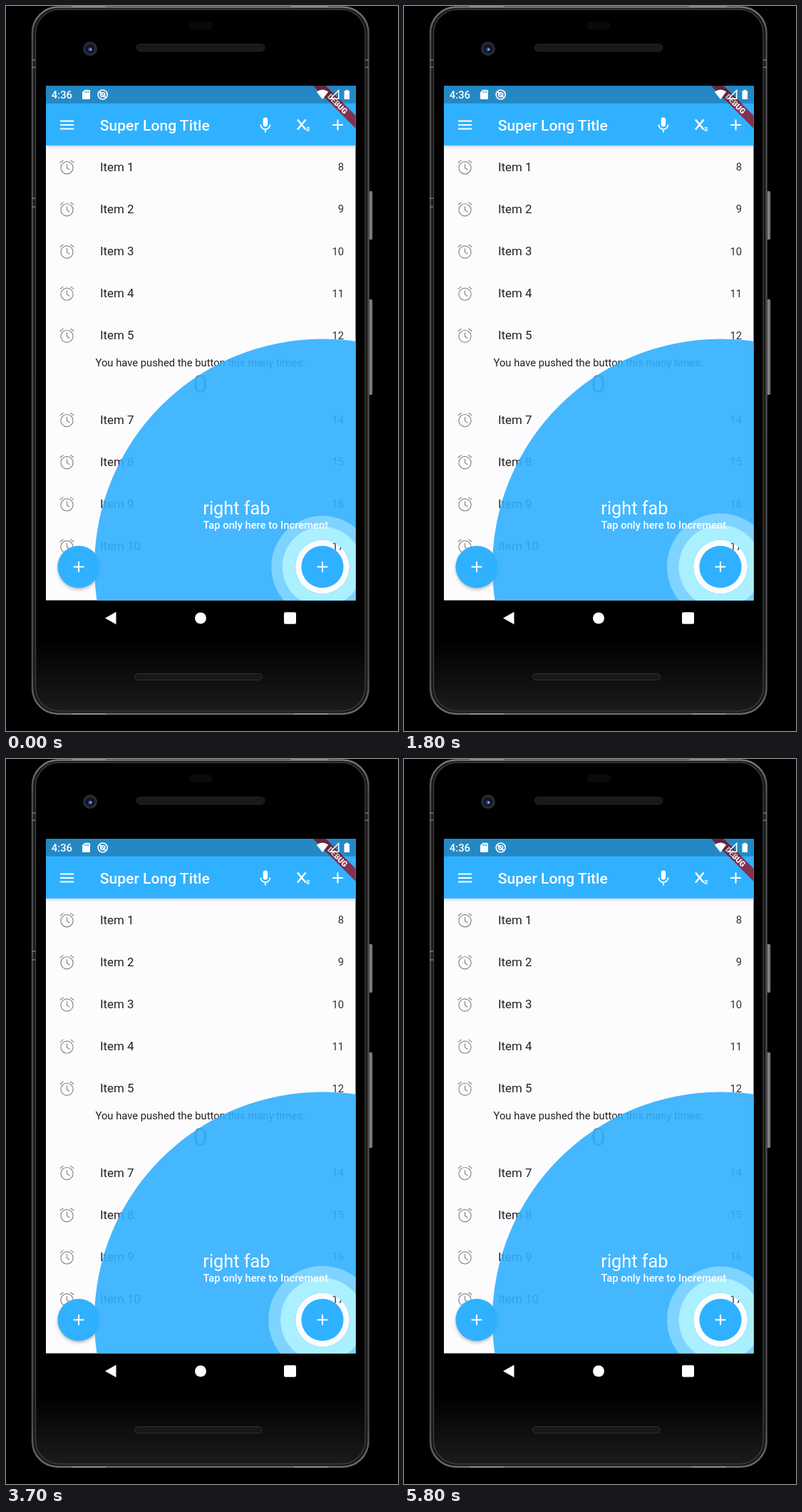
An HTML page that plays this animation: 550x1018 px, repeating every 5840 ms.

```html
<!DOCTYPE html>
<html lang="en">
<head>
<meta charset="utf-8">
<title>Feature highlight</title>
<style>
  html, body { margin: 0; width: 100%; height: 100%; overflow: hidden; background: #000; }
  svg { display: block; width: 100vw; height: 100vh; }
  text { font-family: Roboto, "Noto Sans", sans-serif; }
</style>
</head>
<body>
<svg viewBox="0 0 550 1018">
  <defs>
    <linearGradient id="rim" x1="0" y1="0" x2="0" y2="1">
      <stop offset="0" stop-color="#777"/>
      <stop offset=".05" stop-color="#4c4c4e"/>
      <stop offset=".94" stop-color="#4a4a4b"/>
      <stop offset="1" stop-color="#6c6c68"/>
    </linearGradient>
    <linearGradient id="chin" x1="0" y1="0" x2="0" y2="1">
      <stop offset=".9" stop-color="#000"/>
      <stop offset="1" stop-color="#1b1b1b"/>
    </linearGradient>
    <linearGradient id="key" x1="0" x2="1">
      <stop offset="0" stop-color="#3c3c3c"/>
      <stop offset=".6" stop-color="#92928e"/>
      <stop offset="1" stop-color="#444"/>
    </linearGradient>
    <filter id="soft" x="-30%" y="-30%" width="160%" height="160%">
      <feGaussianBlur stdDeviation="2.5"/>
    </filter>
    <clipPath id="screen"><path d="M56 112H490.500V834.500H56Z"/></clipPath>
    <g id="alarm" fill="none" stroke="#858580" stroke-width="1.150">
      <circle cy="1.200" r="8.600"/>
      <path d="M0 -4V1.500L3.800 4M-9.800 -5.800L-5 -9.600M9.800 -5.800L5 -9.600"/>
    </g>
    <path id="plus" d="M-7.400 0H7.400M0 -7.400V7.400" stroke="#fff" stroke-width="2.100"/>
  </defs>

  <!-- phone body -->
  <g>
    <rect x="508" y="260" width="6.500" height="68" rx="2" fill="url(#key)"/>
    <rect x="508" y="412" width="6.500" height="134" rx="2" fill="url(#key)"/>
    <rect x="37" y="1.500" width="471.500" height="992.500" rx="36" fill="#171717" stroke="url(#rim)" stroke-width="2.500"/>
    <rect x="41.500" y="5" width="462.500" height="985" rx="33" fill="url(#chin)" stroke="#3b3b3c" stroke-width="1.500"/>
    <path d="M36 76H41M36 86H41M36 270H41M36 282H41M504 76H509M504 86H509" stroke="#777" stroke-width="1.500"/>
    <path d="M92 1H140M400 1H452M92 994H140M404 994H452" stroke="#8a8a84" stroke-width="2"/>
    <rect x="257" y="22" width="32" height="11" rx="4" fill="#09090e"/>
    <rect x="183" y="53.500" width="180" height="10" rx="5" fill="#191919" stroke="#252525"/>
    <rect x="180.500" y="937.500" width="179" height="9" rx="4.500" fill="#181818" stroke="#303030"/>
    <circle cx="118" cy="60" r="10" fill="#2b2b2d"/>
    <circle cx="118" cy="60" r="6.500" fill="#11142b"/>
    <circle cx="118" cy="61" r="2.700" fill="#36529c"/>
    <circle cx="119" cy="61" r="1.200" fill="#a9c2f2"/>
  </g>

  <g clip-path="url(#screen)">
    <path d="M56 112H491V835H56Z" fill="#fcfcfe"/>
    <g id="rows"></g>
    <text x="272.500" y="505.500" font-size="14.780" text-anchor="middle" fill="#222">You have pushed the button this many times:</text>
    <text x="272.500" y="543" font-size="35.900" text-anchor="middle" fill="#757575">0</text>

    <!-- app bar -->
    <path d="M56 137H491V197H56Z" fill="#7f9fb2" filter="url(#soft)" opacity=".55"/>
    <path d="M56 112H491V195.700H56Z" fill="#30b1ff"/>
    <path d="M76 161.500H95.200M76 167H95.200M76 172.500H95.200" stroke="#fff" stroke-width="2.100"/>
    <text x="131.700" y="174.700" font-size="21.120" font-weight="500" fill="#fff">Super Long Title</text>
    <rect x="360.700" y="156.500" width="6.400" height="13" rx="3.200" fill="#fff"/>
    <path d="M357.300 166.500A6.600 6.600 0 0 0 370.500 166.500M363.900 173V177.500" fill="none" stroke="#fff" stroke-width="1.900"/>
    <path d="M409 159.500L420.500 173.500M420.500 159.500L409 173.500" stroke="#fff" stroke-width="2.500"/>
    <path d="M421.500 170.500H425.200V172.700H422.200V174.900H426" fill="none" stroke="#fff" stroke-width="1.100"/>
    <use href="#plus" x="465.500" y="167"/>

    <!-- left button -->
    <circle cx="102" cy="790" r="29" fill="#000" opacity=".3" filter="url(#soft)"/>
    <circle cx="102" cy="787.500" r="29.600" fill="#30b1ff"/>
    <use href="#plus" x="102" y="787.500"/>

    <!-- highlight -->
    <path id="disc" fill="#30b0ff" fill-opacity=".9" fill-rule="evenodd"/>
    <path id="outer" fill="#7fd3ff" fill-rule="evenodd"/>
    <path id="inner" fill="#aaf0ff" fill-rule="evenodd"/>
    <circle cx="444" cy="787.500" r="29.600" fill="#30b1ff"/>
    <use href="#plus" x="444" y="787.500"/>
    <text x="276.300" y="714" font-size="25.340" fill="#fff">right fab</text>
    <text x="276.500" y="734" font-size="14.780" font-weight="500" fill="#fff">Tap only here to Increment</text>

    <!-- banner and status bar -->
    <g transform="translate(490.500 112) rotate(45)">
      <path d="M-43 29.600H43V42.200H-43Z" fill="#931a30" fill-opacity=".84"/>
      <text y="39.700" font-size="10.770" font-weight="900" text-anchor="middle" fill="#fff">DEBUG</text>
    </g>
    <path d="M56 112H491V136.800H56Z" fill="#000" opacity=".23"/>
    <g fill="#fff">
      <text x="63.800" y="130" font-size="14.800" font-weight="500">4:36</text>
      <path d="M110.500 117.700H116.500Q118 117.700 118 119.200V129.500Q118 131 116.500 131H108.500Q107 131 107 129.500V121.300Z"/>
      <path d="M111 119.500V122M113.300 119.500V122M115.600 119.500V122" stroke="#2788c4"/>
      <g fill="none" stroke="#fff" stroke-width="1.700">
        <circle cx="135.700" cy="124.500" r="6.500"/>
        <circle cx="135.700" cy="124.500" r="3"/>
        <path d="M131 120L140.300 129"/>
      </g>
      <path d="M435.800 120.500Q444 114.700 452.200 120.500L444 131Z"/>
      <path d="M466.700 118.500V130.200H455Z" fill="none" stroke="#fff" stroke-width="1.500"/>
      <path d="M476.500 117.700H480V119H482V131H474.500V119H476.500Z"/>
    </g>
  </g>

  <!-- navigation -->
  <g fill="#fff">
    <path d="M139 859.500L154.500 850.800V868.200Z"/>
    <circle cx="273" cy="859.500" r="8"/>
    <rect x="390" y="851.200" width="17" height="16.600" rx="2"/>
  </g>
</svg>
<script>
const LOOP = 5840, HALF = 1000, LOW_POINT = 550;
const CENTER = { x: 444, y: 787.5 }, HOLE = 38;
const DP = 1.056;
const byId = id => document.getElementById(id);

const rowMarkup = n => {
  const y = 226 + (n - 1) * 59.15;
  return `<use href="#alarm" x="85.500" y="${y}"/>
    <text x="132" y="${y + 5.6}" font-size="16.900" fill="#222">Item ${n}</text>
    <text x="474" y="${y + 5.2}" font-size="14.780" text-anchor="end" fill="#303030">${n + 7}</text>`;
};
byId('rows').innerHTML = [1, 2, 3, 4, 5, 7, 8, 9, 10].map(rowMarkup).join('');

const circle = r => `M${CENTER.x - r} ${CENTER.y}a${r} ${r} 0 1 0 ${2 * r} 0a${r} ${r} 0 1 0 ${-2 * r} 0Z`;
const setRing = (id, r) => byId(id).setAttribute('d', circle(r) + circle(HOLE));

// cubic-bezier(.4, 0, .2, 1), solved by bisection
function ease(x) {
  let lo = 0, hi = 1;
  for (let i = 0; i < 24; i++) {
    const s = (lo + hi) / 2, q = 1 - s;
    if (1.2 * q * q * s + 0.6 * q * s * s + s ** 3 < x) lo = s; else hi = s;
  }
  return lo * lo * (3 - 2 * lo);
}

function draw(time) {
  const phase = (time % LOOP - LOW_POINT + 2 * HALF) % (2 * HALF) / HALF;
  const v = ease(phase > 1 ? 2 - phase : phase);
  setRing('outer', DP * (48 + 24 * v));
  setRing('inner', DP * (40 + 16 * v));
}

setRing('disc', 320);
const start = performance.now();
function tick() {
  draw(performance.now() - start);
  requestAnimationFrame(tick);
}
tick();
</script>
</body>
</html>
```
